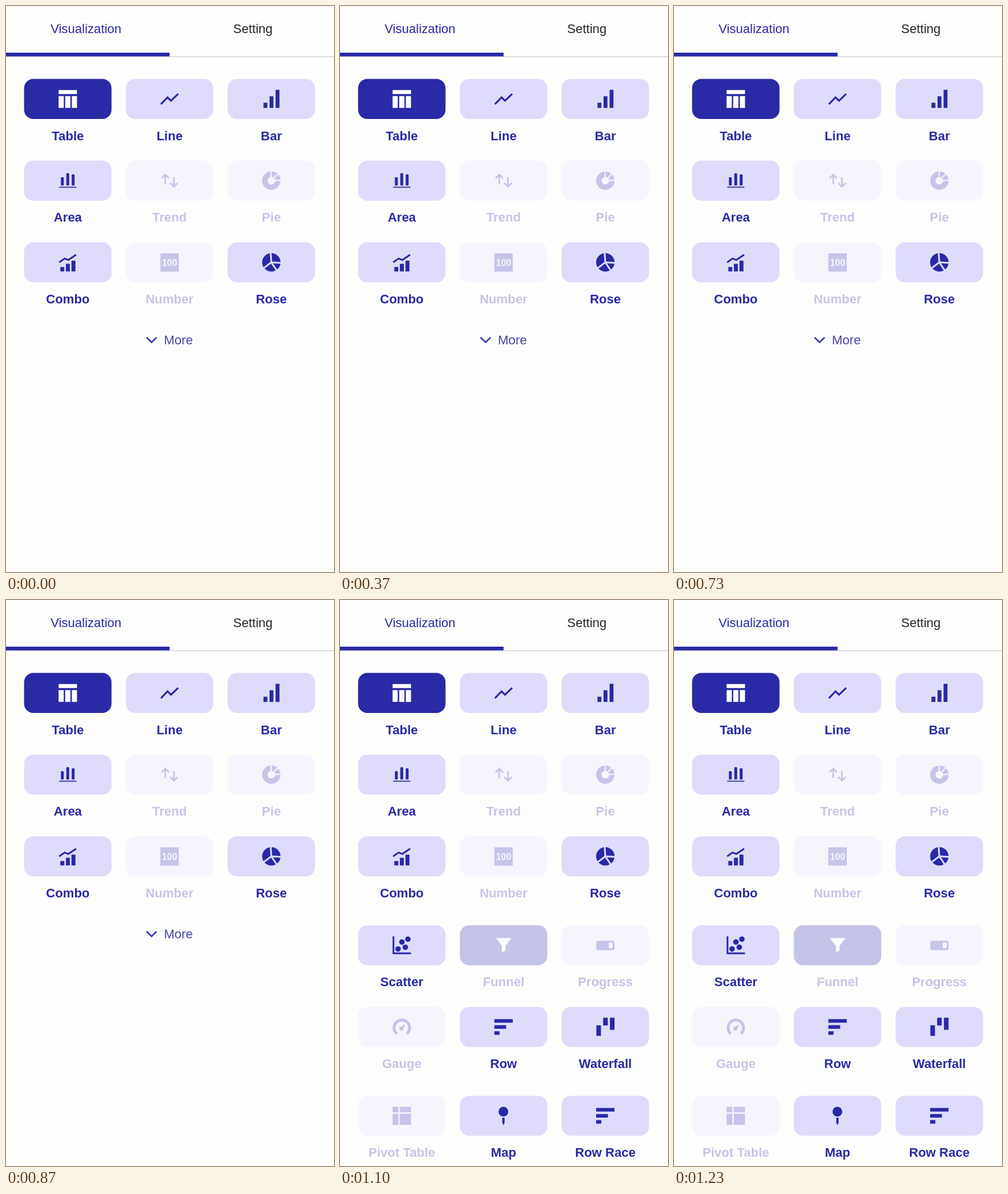
Recreate the animation shown at these times as an HTML page with a canvas. Size 570 px wide and 982 px high, loop 1.26 s.

```html
<!DOCTYPE html>
<html lang="en">
<head>
<meta charset="utf-8">
<title>Visualization</title>
<style>
  html, body { margin: 0; width: 100%; height: 100%; overflow: hidden; background: #fdfdfc; }
  canvas { display: block; width: 570px; height: 982px; }
</style>
</head>
<body>
<canvas id="stage" width="570" height="982"></canvas>
<script>
const ctx = document.getElementById('stage').getContext('2d');
const LOOP = 1260, EXPAND_AT = 1100, HOVER_START = 960, HOVER_END = 1060;
const PAGE = '#fdfdfc', PRIMARY = '#2a29a6', TILE = '#dedcfa', FAINT_TILE = '#f6f5fd', FAINT = '#c6c4e8';
const FONT = '22px "Liberation Sans", Arial, sans-serif';
const TILE_W = 152, TILE_H = 69.4;
const rad = degrees => degrees * Math.PI / 180;
const times = (n, fn) => { for (let i = 0; i < n; i++) fn(i); };

function text(label, x, y, color, font = FONT, align = 'center') {
  ctx.font = font;
  ctx.textAlign = align;
  ctx.fillStyle = color;
  ctx.fillText(label, x, y);
}
function rounded(x, y, w, h, r) {
  ctx.beginPath();
  ctx.roundRect(x, y, w, h, r);
  ctx.fill();
}
function trace(points) {
  ctx.beginPath();
  for (const [x, y] of points) ctx.lineTo(x, y);
}
function polyline(width, ...points) {
  ctx.lineWidth = width;
  trace(points);
  ctx.stroke();
}
function polygon(...points) {
  trace(points);
  ctx.fill();
}
function arc(r, width, from, to) {
  ctx.lineWidth = width;
  ctx.beginPath();
  ctx.arc(0, 0, r, rad(from), rad(to));
  ctx.stroke();
}
function dot(x, y, r) {
  ctx.beginPath();
  ctx.arc(x, y, r, 0, 2 * Math.PI);
  ctx.fill();
}
// A disc cut by gaps that run from its centre outwards.
function cutDisc(tile, gap, ...angles) {
  dot(0, 0, 16);
  ctx.strokeStyle = tile;
  for (const a of angles) polyline(gap, [0, 0], [18 * Math.cos(rad(a)), 18 * Math.sin(rad(a))]);
}

// Each icon is drawn around the centre of its tile.
const icons = {
  table() {
    ctx.fillRect(-16, -15.5, 32, 7);
    times(3, i => ctx.fillRect(-16 + 11.5 * i, -5, 9, 20.5));
  },
  line() {
    polyline(3.2, [-15, 9], [-3.5, -2.8], [2.5, 3], [15, -9]);
  },
  bar() {
    times(3, i => ctx.fillRect(-13.6 + 10.5 * i, 15.5, 6.7, -9 - 11.2 * i));
  },
  area() {
    times(3, i => rounded(-12 + 9.4 * i, i ? -15 + 2 * i : -6, 5, i ? 23.5 - 2 * i : 14.5, 1.5));
    ctx.fillRect(-15, 10.5, 30, 1.7);
  },
  trend() {
    times(2, i => {
      ctx.rotate(Math.PI * i);
      polyline(2.8, [-7.5, 6], [-7.5, -10]);
      polyline(2.8, [-14, -4], [-7.5, -10.5], [-1, -4]);
    });
  },
  pie(tile) {
    cutDisc(tile, 2.2, -92, -46, -3);
    ctx.fillStyle = tile;
    dot(0, 0, 6.6);
  },
  combo() {
    polyline(3, [-15, 0], [-5.5, -6.7], [1, -4.2], [14.5, -13.3]);
    times(3, i => ctx.fillRect(-13 + 9.7 * i, 15.7, 6.9, -7.7 - 5.5 * i));
  },
  number(tile) {
    ctx.fillRect(-16, -15.7, 32, 31.7);
    text('100', 0, 6, tile, 'bold 16px "Liberation Sans", Arial, sans-serif');
  },
  rose(tile) {
    cutDisc(tile, 3, -94, 3, 56, 143);
  },
  scatter() {
    polyline(3, [-14.5, -15.5], [-14.5, 14], [16, 14]);
    times(2, i => {
      dot(10.6 - 4.5 * i, -10.5 + 14 * i, 4.8);
      dot(0.2 - 6.7 * i, -5.5 + 12 * i, 4.8);
    });
  },
  funnel() {
    polygon([-13.5, -12.5], [13.5, -12.5], [3.5, 1], [3.5, 9], [-2.8, 12.5], [-2.8, 1]);
  },
  progress(tile) {
    rounded(-15.8, -7.7, 31.8, 16.2, 3.5);
    ctx.fillStyle = tile;
    rounded(6, -4.7, 7, 10, [0, 3, 3, 0]);
  },
  gauge() {
    ctx.translate(0, 1.5);
    arc(13.5, 5, 130, 410);
    dot(-0.8, 1.7, 3.3);
    polygon([-3.5, -0.3], [6, -6], [1.6, 4.1]);
  },
  row() {
    times(3, i => ctx.fillRect(-16, -13.5 + 10.5 * i, 32 - 11.5 * i, 6.2));
  },
  waterfall() {
    times(3, i => ctx.fillRect(-15.6 + 11.8 * i, i ? -16 : -2.8, 8, i ? 6 + 7.5 * i : 18.3));
  },
  pivot() {
    for (const [x, w] of [[-16, 10], [-3.6, 19.6]])
      for (const [y, h] of [[-15.5, 9.5], [-3.5, 19.3]]) ctx.fillRect(x, y, w, h);
  },
  map() {
    dot(-0.3, -7.2, 8.5);
    polygon([-2.3, 3.5], [1.8, 3.5], [1.8, 12], [-0.3, 16.5], [-2.3, 12]);
  }
};

const STYLES = {
  active: [PRIMARY, PAGE, PRIMARY],
  normal: [TILE, PRIMARY, PRIMARY],
  disabled: [FAINT_TILE, FAINT, FAINT],
  solid: ['#c4c4e7', PAGE, FAINT]
};
const SECTIONS = [
  [
    [['Table', 'table', 'active'], ['Line', 'line'], ['Bar', 'bar']],
    [['Area', 'area'], ['Trend', 'trend', 'disabled'], ['Pie', 'pie', 'disabled']],
    [['Combo', 'combo'], ['Number', 'number', 'disabled'], ['Rose', 'rose']]
  ], [
    [['Scatter', 'scatter'], ['Funnel', 'funnel', 'solid'], ['Progress', 'progress', 'disabled']],
    [['Gauge', 'gauge', 'disabled'], ['Row', 'row'], ['Waterfall', 'waterfall']]
  ], [
    [['Pivot Table', 'pivot', 'disabled'], ['Map', 'map'], ['Row Race', 'row']]
  ]
];

function drawTile(cx, top, [label, icon, style = 'normal']) {
  const [tile, ink, labelColor] = STYLES[style];
  ctx.fillStyle = tile;
  rounded(cx - TILE_W / 2, top, TILE_W, TILE_H, 16);
  ctx.save();
  ctx.translate(cx, top + TILE_H / 2);
  ctx.fillStyle = ctx.strokeStyle = ink;
  icons[icon](tile);
  ctx.restore();
  text(label, cx, Math.round(top + 106), labelColor, 'bold ' + FONT);
}

function drawSections(sections) {
  let top = 126.6;
  for (const rows of sections) {
    for (const row of rows) {
      row.forEach((item, i) => drawTile(107.4 + 176.85 * i, top, item));
      top += 141.75;
    }
    top += 12.4;
  }
}

function drawTabs() {
  text('Visualization', 139, 47, PRIMARY);
  text('Setting', 429, 47, '#25252b');
  ctx.fillStyle = '#cfced4';
  ctx.fillRect(0, 87.2, 570, 1.4);
  ctx.fillStyle = PRIMARY;
  ctx.fillRect(0, 81, 284.3, 6.4);
}

function drawMore(time) {
  const hover = Math.min(1, Math.max(0, (time - HOVER_START) / (HOVER_END - HOVER_START)));
  const mix = (a, b) => Math.round(a + (b - a) * hover);
  const color = `rgb(${mix(69, 48)}, ${mix(68, 47)}, ${mix(178, 130)})`;
  ctx.strokeStyle = color;
  polyline(3, [244.3, 575], [253, 583.5], [261.7, 575]);
  text('More', 274.5, 587, color, FONT, 'left');
}

function draw(now) {
  const time = now % LOOP;
  const expanded = time >= EXPAND_AT;
  ctx.fillStyle = PAGE;
  ctx.fillRect(0, 0, 570, 982);
  drawTabs();
  drawSections(expanded ? SECTIONS : SECTIONS.slice(0, 1));
  if (!expanded) drawMore(time);
}

const start = performance.now();
function frame() {
  draw(performance.now() - start);
  requestAnimationFrame(frame);
}
frame();
</script>
</body>
</html>
```
